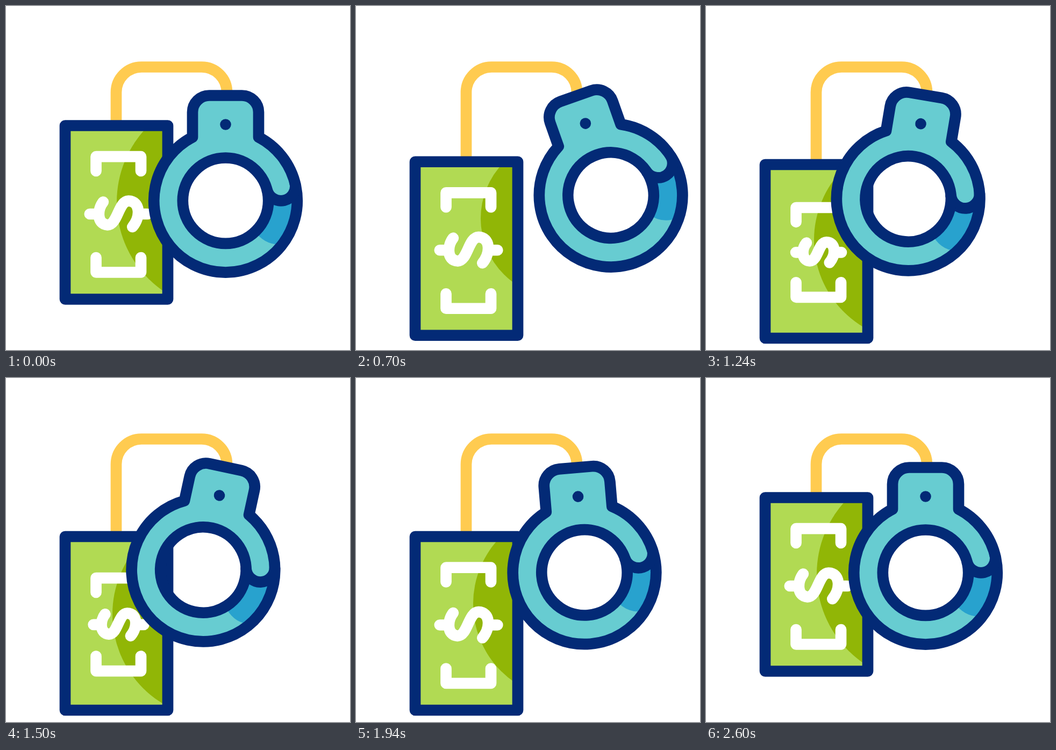
Write an HTML page that moves like this. It is 640 px wide and 640 px high and loops after 2.82 s.

```html
<!DOCTYPE html>
<html lang="en">
<head>
<meta charset="utf-8">
<title>Bribe and handcuff</title>
<style>
  html, body { margin: 0; width: 100%; height: 100%; overflow: hidden; background: #fff; }
  svg { display: block; width: 100%; height: 100%; }
  .line { fill: none; stroke-width: 20.7; stroke-linecap: round; stroke-linejoin: round; }
  .navy { stroke: #032a76; }
  .white { stroke: #fff; }
</style>
</head>
<body>
<svg viewBox="0 0 640 640">
  <clipPath id="inside"><rect x="110" y="222.5" width="191" height="323"/></clipPath>

  <path class="line" stroke="#ffcb50" d="M205 300V160.5a47 47 0 0 1 47-47H364a47 47 0 0 1 47 47V172"/>

  <g id="card">
    <g clip-path="url(#inside)">
      <rect x="100" y="212" width="212" height="344" fill="#b1da53"/>
      <circle id="shade" fill="#91b606"/>
    </g>
    <rect class="line navy" x="110" y="222.5" width="191" height="323"/>
    <path id="top" class="line white" d="M167.5 307V280.2H251V307"/>
    <path id="bottom" class="line white" d="M167.5 468V495.5H251V468"/>
    <path id="dollar" class="line white" d="M155.8 387H170M248 387H263.3
      M180.8 364.5C170 378 168 406 189 407.3C208 407 209 363 228 362.7C250 363 251 392 235.3 411"/>
  </g>

  <g id="cuff">
    <path fill="#67ccd1" fill-rule="evenodd" d="M347 244V197.5a31 31 0 0 1 31-31H439a31 31 0 0 1 31 31V244
      A133.3 133.3 0 1 1 347 244ZM328.8 362.2a79.7 79.7 0 1 0 159.4 0a79.7 79.7 0 1 0-159.4 0Z"/>
    <path fill="#28a2ce" d="M486 343.5A26.8 26.8 0 0 0 538 331A133.3 133.3 0 0 1 512 443
      Q482 446 462 418A79.7 79.7 0 0 0 486 343.5Z"/>
    <path class="line navy" d="M347 244V197.5a31 31 0 0 1 31-31H439a31 31 0 0 1 31 31V244
      A133.3 133.3 0 1 1 347 244Z"/>
    <path class="line navy" d="M486 343.5A26.8 26.8 0 0 0 538 331"/>
    <circle class="line navy" cx="408.5" cy="362.2" r="79.7"/>
    <circle cx="408.5" cy="220.5" r="10.3" fill="#032a76"/>
  </g>
</svg>
<script>
const LOOP = 2820;
const WEIGHT = 20.7;

const set = (id, attrs) => {
  const el = document.getElementById(id);
  for (const name in attrs) el.setAttribute(name, attrs[name]);
};

// Smooth step from 0 to 1 between two times.
function ease(t, from, to) {
  const u = Math.min(1, Math.max(0, (t - from) / (to - from)));
  return u * u * (3 - 2 * u);
}

// Rises to 1 at the peak and falls back to 0.
const pulse = (t, from, peak, to) => ease(t, from, peak) - ease(t, peak, to);

function draw(t) {
  const right = pulse(t, 200, 800, 1400);
  const left = pulse(t, 800, 1400, 1800);
  const back = pulse(t, 1400, 1800, 2600);

  const swing = -21 * right + 15.9 * left
    - 7 * pulse(t, 1400, 1800, 2200) + 0.65 * pulse(t, 1800, 2200, 2600);
  set('cuff', { transform: `rotate(${swing} 412 166)` });

  set('shade', {
    cx: 407 - 30 * right - 15 * left - 13 * back,
    cy: 365 - 40 * right + 6 * left - 19 * back,
    r: 201 - 58 * right - 3 * left - 26 * back
  });

  const drop = 72.5 * (ease(t, 200, 800) - ease(t, 2000, 2600));
  set('card', { transform: `translate(0 ${drop})` });

  const squeeze = ease(t, 800, 1000) - ease(t, 1420, 1780);
  set('top', { transform: `translate(0 ${22.3 * squeeze})` });
  set('bottom', { transform: `translate(0 ${-26.2 * squeeze})` });

  const scale = 1 - 0.21 * ease(t, 800, 1000) + 0.31 * ease(t, 1400, 1700) - 0.1 * ease(t, 1700, 1800);
  set('dollar', {
    transform: `translate(209.3 382) scale(${scale}) translate(-209.3 -382)`,
    style: `stroke-width:${WEIGHT / scale}`
  });
}

const start = performance.now();
function tick() {
  draw((performance.now() - start) % LOOP);
  requestAnimationFrame(tick);
}
tick();
</script>
</body>
</html>
```
